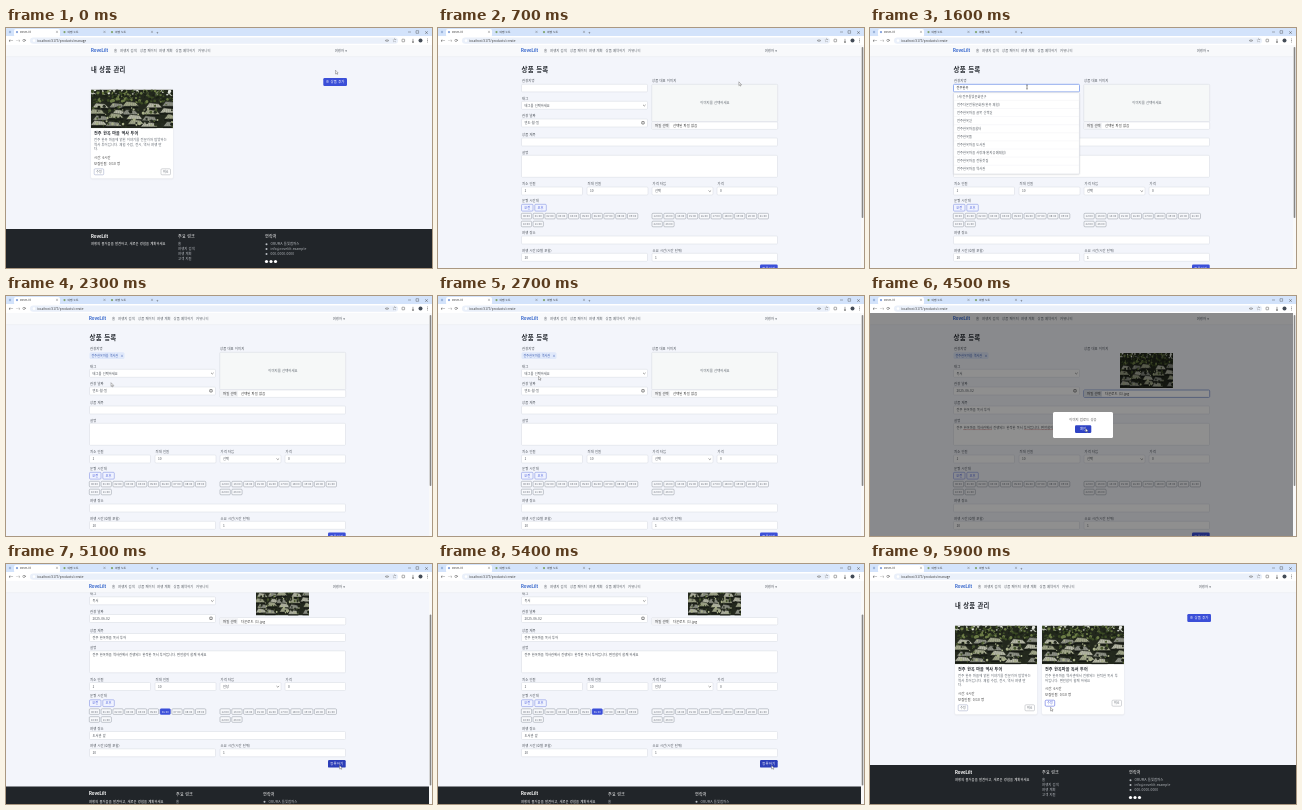
An HTML page with a canvas that plays this animation: 426 px wide and 240 px high, repeating every 6000 ms.

```html
<!DOCTYPE html>
<html lang="ko">
<head>
<meta charset="utf-8">
<style>
html, body { margin: 0; width: 100%; height: 100%; overflow: hidden; }
canvas { display: block; width: 426px; height: 240px; }
</style>
</head>
<body>
<canvas id="stage"></canvas>
<script>
const W = 426, H = 240, LOOP = 6000, STEP = 100;
const BRAND = 'RoveLilt', BLUE = '#3b4fd8', INK = '#24282e', GREY = '#5c636c', LINE = '#d5d9e0';
const PAGE = '#f3f5fb', FORM_AT = 400, LIST_AT = 5500;
const TITLE = '전주 한옥마을 독서 투어';
const ABOUT = '전주 한옥마을 역사관에서 진행되는 한적한 독서 투어입니다. 편안함이 함께 하세요';
const PLACES = ['(사)전주들빛문화연구', '전주다온전통문화관(한옥 체험)', '전주한옥마을 골목 산책길',
  '전주한옥길', '전주한옥마을쉼터', '전주한옥뜰', '전주한옥마을 도서관', '전주한옥마을 사랑채(한지공예체험)',
  '전주한옥마을 전통찻집', '전주한옥마을 역사관'];
// time, x, y, shape
const POINTER = [[0, 330, 44], [300, 329, 55], [600, 329, 55], [1000, 152, 59, 'beam'], [1600, 157, 59, 'beam'],
  [1900, 108, 92], [2100, 108, 92], [2600, 101, 82], [2800, 101, 82], [3000, 120, 96], [3150, 130, 114, 'beam'],
  [3400, 135, 135, 'beam'], [3600, 224, 98], [4200, 224, 98], [4400, 216, 134], [4600, 216, 134],
  [4800, 159, 149], [4900, 110, 172, 'beam'], [5100, 334, 203], [5400, 334, 203], [5800, 181, 145], [6000, 181, 145]];

const canvas = document.getElementById('stage');
const c = canvas.getContext('2d');
const ratio = window.devicePixelRatio || 1;
canvas.width = W * ratio;
canvas.height = H * ratio;

const clamp = v => Math.max(0, Math.min(1, v));
const ease = v => v * v * (3 - 2 * v);
const typed = (s, t, from, to) => s.slice(0, Math.ceil(s.length * clamp((t - from) / (to - from))));

function text(s, x, y, size = 3.5, color = INK, weight = 400, align = 'left') {
  c.font = `${weight} ${size}px "Noto Sans CJK KR", "Noto Sans CJK", "Noto Sans", sans-serif`;
  c.letterSpacing = size * .03 + 'px';
  c.wordSpacing = size * .1 + 'px';
  c.textAlign = align;
  c.textBaseline = 'middle';
  c.fillStyle = color;
  c.fillText(s, x, y);
}

function box(x, y, w, h, fill, stroke, r = 1, lineWidth = .5) {
  c.beginPath();
  c.roundRect(x, y, w, h, r);
  if (fill) { c.fillStyle = fill; c.fill(); }
  if (stroke) { c.strokeStyle = stroke; c.lineWidth = lineWidth; c.stroke(); }
}

function dot(x, y, r, fill) {
  c.beginPath();
  c.arc(x, y, r, 0, 7);
  c.fillStyle = fill;
  c.fill();
}

function path(points, stroke, width = .6, fill) {
  c.beginPath();
  points.forEach(([x, y]) => c.lineTo(x, y));
  if (fill) { c.closePath(); c.fillStyle = fill; c.fill(); }
  if (stroke) { c.strokeStyle = stroke; c.lineWidth = width; c.stroke(); }
}

function shadowed(draw, blur = 2) {
  c.save();
  c.shadowColor = 'rgba(0,0,0,.1)';
  c.shadowBlur = blur * ratio;
  c.shadowOffsetY = .5 * ratio;
  draw();
  c.restore();
}

function brand(x, y, color) {
  c.font = '700 4.4px Inter, sans-serif';
  c.letterSpacing = c.wordSpacing = '0px';
  c.textAlign = 'left';
  c.textBaseline = 'middle';
  c.fillStyle = color;
  c.fillText(BRAND, x, y);
}

// Sunlit tiled roofs among dark trees, in an 82 x 38 space.
function photo(x, y, w, h) {
  let seed = 11;
  const rnd = () => (seed = seed * 16807 % 2147483647) / 2147483647;
  const leaves = (n, x0, y0, dx, dy, colors) => {
    for (let i = 0; i < n; i++) dot(x0 + rnd() * dx, y0 + rnd() * dy, .4 + rnd() * 1.2, colors[i % colors.length]);
  };
  c.save();
  c.translate(x, y);
  c.scale(w / 82, h / 38);
  c.beginPath();
  c.rect(0, 0, 82, 38);
  c.clip();
  c.fillStyle = '#23281d';
  c.fillRect(0, 0, 82, 38);
  leaves(40, 0, 0, 82, 5, ['#e3e6df', '#b9beae']);
  leaves(220, 0, 1, 82, 13, ['#1a2014', '#3c4c25', '#6c7c46', '#20271a']);
  for (let i = 0; i < 20; i++) {
    const rx = (i % 5) * 18 - 6 + rnd() * 9, ry = 11 + Math.floor(i / 5) * 6 + rnd() * 3;
    path([[rx, ry + 5], [rx + 4, ry], [rx + 13, ry + 1], [rx + 17, ry + 5]], '#1f221c', .6,
      ['#b9bba9', '#8d9085', '#a3a88a'][i % 3]);
    for (let k = 1; k < 6; k++) path([[rx + 3 + k * 1.7, ry + .6], [rx + k * 2.6, ry + 5]], '#62665a', .3);
    path([[rx, ry + 6], [rx + 16, ry + 6]], '#161914', 1.2);
  }
  leaves(130, 0, 15, 82, 22, ['#1c2117', '#a9b08a', '#4a5930', '#272c22']);
  c.restore();
}

function browser(form) {
  c.fillStyle = '#d3e3fb';
  c.fillRect(0, 0, W, 8);
  box(8, 1, 46, 8, '#fff', null, 2);
  c.fillStyle = '#fff';
  c.fillRect(0, 8, W, 9);
  dot(4, 4, 1.2, '#9db5dc');
  [['#7d9bd8', BRAND], ['#7fa36a', '여행 노트'], ['#7fa36a', '여행 노트']].forEach(([color, name], i) => {
    const x = 11 + i * 47.5;
    dot(x, 4.1, 1.1, color);
    text(name, x + 3, 4.2, 2.7, '#333');
    text('×', x + 40, 4.1, 3.5, '#555', 400, 'center');
  });
  text('+', 151.5, 4, 4, '#444', 400, 'center');
  path([[402, 4], [405, 4]], '#444', .4);
  box(410, 2.7, 2.6, 2.6, null, '#444', 0, .4);
  text('×', 420.5, 4, 4.5, '#444', 400, 'center');
  text('←', 5, 12.3, 4.5, '#444', 400, 'center');
  text('→', 12, 12.3, 4.5, '#999', 400, 'center');
  text('⟳', 18.5, 12.3, 4.5, '#444', 400, 'center');
  box(24, 9.4, 368, 6.4, '#eaf0fa', null, 3.2);
  dot(28, 12.6, 1.3, '#fff');
  text('localhost:5173/products/' + (form ? 'create' : 'manage'), 31, 12.6, 3, '#333');
  box(379.5, 12, 3, 1.2, null, '#555', .6, .5);
  text('☆', 388.5, 12.5, 4, '#555', 400, 'center');
  box(396, 11.2, 2.6, 2.6, null, '#555', .4);
  text('↓', 407, 12.4, 4.5, '#333', 700, 'center');
  dot(414.5, 12.5, 2, '#444c57');
  text('⋮', 421.5, 12.5, 4.5, '#444', 700, 'center');
}

function navbar(dx) {
  shadowed(() => { c.fillStyle = '#f8f9fb'; c.fillRect(0, 17, W, 11.5); }, 1.5);
  brand(85 + dx, 23, '#3566cc');
  [['홈', 108], ['여행지 검색', 114], ['상품 페이지', 134], ['여행 계획', 153], ['상품 예약하기', 169.5], ['커뮤니티', 192]]
    .forEach(([s, x]) => text(s, x + dx, 23, 3.3, '#555b63'));
  text('여행자 ▾', 341 + dx, 23, 3.3, '#555b63', 400, 'right');
}

function footer(y, dx) {
  c.save();
  c.translate(dx, y);
  c.fillStyle = '#212529';
  c.fillRect(-dx, 0, W, 90);
  brand(85, 7.6, '#fff');
  text('여행의 즐거움을 발견하고, 새로운 경험을 계획하세요', 85, 15, 3.25, '#fff', 500);
  text('주요 링크', 172, 7.6, 4.1, '#fff', 500);
  text('연락처', 259, 7.6, 4.1, '#fff', 500);
  ['홈', '여행지 검색', '여행 계획', '고객 지원'].forEach((s, i) => text(s, 172, 15 + i * 4.8, 3.3, '#b9bdc2'));
  ['ORUMA 들빛캠퍼스', 'info@rovelilt.example', '000-0000-0000'].forEach((s, i) => {
    dot(260.5, 15.2 + i * 4.9, 1, '#b9bdc2');
    text(s, 264.5, 15 + i * 4.9, 3.3, '#b9bdc2');
  });
  [260.5, 265, 269.5].forEach(x => dot(x, 32.5, 1.6, '#fff'));
  c.restore();
}

function card(x, title, lines, hover) {
  shadowed(() => box(x, 61.5, 82, 89, '#fff', null, 1.5));
  photo(x, 61.5, 82, 38.7);
  text(title, x + 3, 105.8, 4.05, INK, 700);
  lines.forEach((s, i) => text(s, x + 3, 112 + i * 4.6, 3.3, GREY));
  const y = 116 + lines.length * 4.6;
  text('시간: 6시간', x + 3, y, 3.3, '#333');
  text('모집인원: 0/10 명', x + 3, y + 5.6, 3.3, '#333');
  box(x + 3.2, y + 11, 9.5, 6, '#fff', hover ? BLUE : '#9aa4c4');
  text('수정', x + 8, y + 14, 2.9, hover ? BLUE : GREY, 400, 'center');
  box(x + 70, y + 11, 9.5, 6, '#fff', '#a9adb3');
  text('취소', x + 74.8, y + 14, 2.9, GREY, 400, 'center');
}

function listPage(t) {
  text('내 상품 관리', 85, 41.5, 6.3, INK, 700);
  box(317.3, 50, 23.7, 8, BLUE, null, 1.2);
  text('⊕ 상품 추가', 329.2, 54, 3.4, '#fff', 400, 'center');
  card(85, '전주 한옥 마을 역사 투어',
    ['전주 한옥 마을에 얽힌 이야기를 전문가와 탐방하는', '역사 투어입니다. 체험 수업, 전시, 역사 여행 만', '다.']);
  if (t >= LIST_AT) card(172, TITLE,
    ['전주 한옥마을 역사관에서 진행되는 한적한 독서 투', '어입니다. 편안함이 함께 하세요'], t >= 5800);
  footer(201, 0);
}

function field(label, x, y, w, value = '', h = 8, arrow) {
  text(label, x + .5, y - 3, 3.3, '#4a5058');
  box(x, y, w, h, '#fff', LINE);
  text(value, x + 3, y + 4, 3.2, '#444a52');
  if (arrow) path([[x + w - 4.5, y + 3.5], [x + w - 3.2, y + 4.7], [x + w - 1.9, y + 3.5]], '#444', .5);
}

function slots(x, first, selected) {
  for (let i = 0; i < 12; i++) {
    const sx = x + (i % 10) * 11.8, sy = i < 10 ? 185.3 : 193.2, on = i === selected;
    box(sx, sy, 10.3, 5.6, on ? BLUE : '#f8f9fc', on ? BLUE : '#8f959f');
    text(String(first + i).padStart(2, '0') + ':00', sx + 5.15, sy + 2.8, 2.7, on ? '#fff' : GREY, 400, 'center');
  }
}

function upload(t) {
  const loaded = t >= 4200, focus = t >= 3500 && t < 4700;
  text('상품 대표 이미지', 214, 52.7, 3.3, '#4a5058');
  if (loaded) photo(250, 57, 53, 35);
  else {
    box(213.7, 56.3, 126, 37.5, '#f6f8f8', LINE);
    text('이미지를 선택하세요', 277, 74.7, 3.3, GREY, 400, 'center');
  }
  box(213.7, 94, 126, 7.4, '#fff', focus ? '#8ea2d6' : LINE, 1, focus ? .9 : .5);
  box(214, 94.3, 18, 6.8, focus ? '#dfe3ea' : '#f3f4f7', null, .8);
  text('파일 선택', 217, 97.8, 3.3, '#333');
  text(loaded ? '다운로드 (1).jpg' : '선택된 파일 없음', 235, 97.8, 3.3, '#333');
}

function formPage(t) {
  const chosen = t >= 2000, late = t >= 4800;
  text('상품 등록', 83.5, 42, 6.5, INK, 700);
  upload(t);
  text('관광지명', 84, 52.7, 3.3, '#4a5058');
  if (chosen) {
    box(83.5, 56.3, 35, 6.6, '#e0e9fb', null, 1.5);
    text('전주한옥마을 역사관', 85.5, 59.6, 3, '#3b5bb0');
    text('×', 116, 59.6, 3.5, '#3b5bb0', 400, 'center');
  }
  field('태그', 83.5, 73.3, 126, t >= 2900 ? '독서' : '태그를 선택하세요', 8, true);
  field('관광 날짜', 83.5, 91, 126, t >= 3000 ? '2025-06-02' : '연도-월-일');
  box(203.8, 93.6, 2.4, 2.4, null, '#222', .2, .5);
  field('상품 제목', 83.5, 110, 256, typed(TITLE, t, 3050, 3250));
  field('설명', 83.5, 127.3, 256, typed(ABOUT, t, 3250, 3500), 22);
  if (t >= 3500 && t < 4700) [[93, 122], [154, 184]].forEach(([a, b]) => path([[a, 133.6], [b, 133.6]], '#c77', .4));
  field('최소 인원', 83.5, 159, 61, '1');
  field('최대 인원', 149, 159, 61, '10');
  field('가격 타입', 214, 159, 61, late ? '인당' : '선택', 8, true);
  field('가격', 279, 159, 60.5, '0');
  text('운영 시간대', 84, 172.7, 3.3, '#4a5058');
  ['오전', '오후'].forEach((s, i) => {
    box(83.5 + i * 13.3, 176.3, 11.5, 6.8, '#f0f3ff', '#7485df');
    text(s, 89.2 + i * 13.3, 179.7, 3.2, BLUE, 400, 'center');
  });
  slots(83.3, 0, late ? 6 : -1);
  slots(214, 12, -1);
  field('여행 장소', 83.5, 208, 256, typed('도서관 앞', t, 4850, 5000));
  field('여행 시간(호텔 포함)', 83.5, 225.3, 126, '10');
  field('소요 시간(시간 단위)', 214, 225.3, 125.5, '1');
  box(322, 236.6, 17.7, 7.5, t >= 5100 ? '#2b3db8' : BLUE, null, 1.2);
  text('등록하기', 330.8, 240.3, 3.4, '#fff', 400, 'center');
  footer(263, -2);
  if (!chosen) placePicker(t);
}

function placePicker(t) {
  const active = t >= 1100;
  box(83.5, 56.3, 126, 7.6, '#fff', active ? '#86a4ee' : LINE, 1, active ? .9 : .5);
  text(typed('전주한옥', t, 1050, 1400), 86.5, 60, 3.2);
  if (t < 1300) return;
  shadowed(() => box(83.5, 64.5, 126, 81.5, '#fff', LINE));
  if (t >= 1800) { c.fillStyle = '#eef1f6'; c.fillRect(84, 137.5, 125, 8); }
  PLACES.forEach((s, i) => {
    text(s, 87, 68.3 + i * 8.1, 3.2, '#555b63');
    if (i < 9) path([[84, 72.4 + i * 8.1], [209, 72.4 + i * 8.1]], '#eceef2', .4);
  });
}

function modal() {
  c.fillStyle = 'rgba(0,0,0,.44)';
  c.fillRect(0, 17, W, H);
  box(183, 116, 60, 26, '#fff', null, 1.5);
  text('이미지 업로드 성공', 213, 123.3, 3.3, '#555', 400, 'center');
  box(205, 129.2, 16.3, 7.8, '#2f43c5', null, 1.2);
  text('확인', 213.1, 133, 3.4, '#fff', 400, 'center');
}

function scrollbar(scroll) {
  c.fillStyle = '#f9f9f9';
  c.fillRect(423, 17, 3, H);
  box(423.7, 19 + scroll * .78, 1.6, 171, '#858585', null, .8);
}

function pointer(t) {
  let i = 0;
  while (i < POINTER.length - 2 && t >= POINTER[i + 1][0]) i++;
  const a = POINTER[i], b = POINTER[i + 1], k = ease(clamp((t - a[0]) / (b[0] - a[0])));
  c.save();
  c.translate(a[1] + (b[1] - a[1]) * k, a[2] + (b[2] - a[2]) * k);
  if ((k < .5 ? a : b)[3]) {
    path([[-.8, -2], [.8, -2]], '#222', .4);
    path([[0, -2], [0, 2]], '#222', .5);
    path([[-.8, 2], [.8, 2]], '#222', .4);
  } else {
    path([[-.5, -1.8], [-.5, 2], [.4, 1.2], [1, 2.5], [1.6, 2.2], [1, 1], [2.2, 1], [-.5, -1.8]], '#444', .35, '#fff');
  }
  c.restore();
}

function render(t) {
  const form = t >= FORM_AT && t < LIST_AT;
  const scroll = form ? 40.5 * ease(clamp((t - 4600) / 200)) : 0;
  c.setTransform(ratio, 0, 0, ratio, 0, 0);
  c.fillStyle = PAGE;
  c.fillRect(0, 0, W, H);
  c.save();
  c.translate(0, -scroll);
  (form ? formPage : listPage)(t);
  c.restore();
  navbar(form ? -2 : 0);
  if (t >= 4300 && t < 4600) modal();
  if (form) scrollbar(scroll);
  browser(form);
  pointer(t);
}

function tick() {
  render(Math.floor(performance.now() % LOOP / STEP) * STEP);
  requestAnimationFrame(tick);
}
tick();
</script>
</body>
</html>
```
